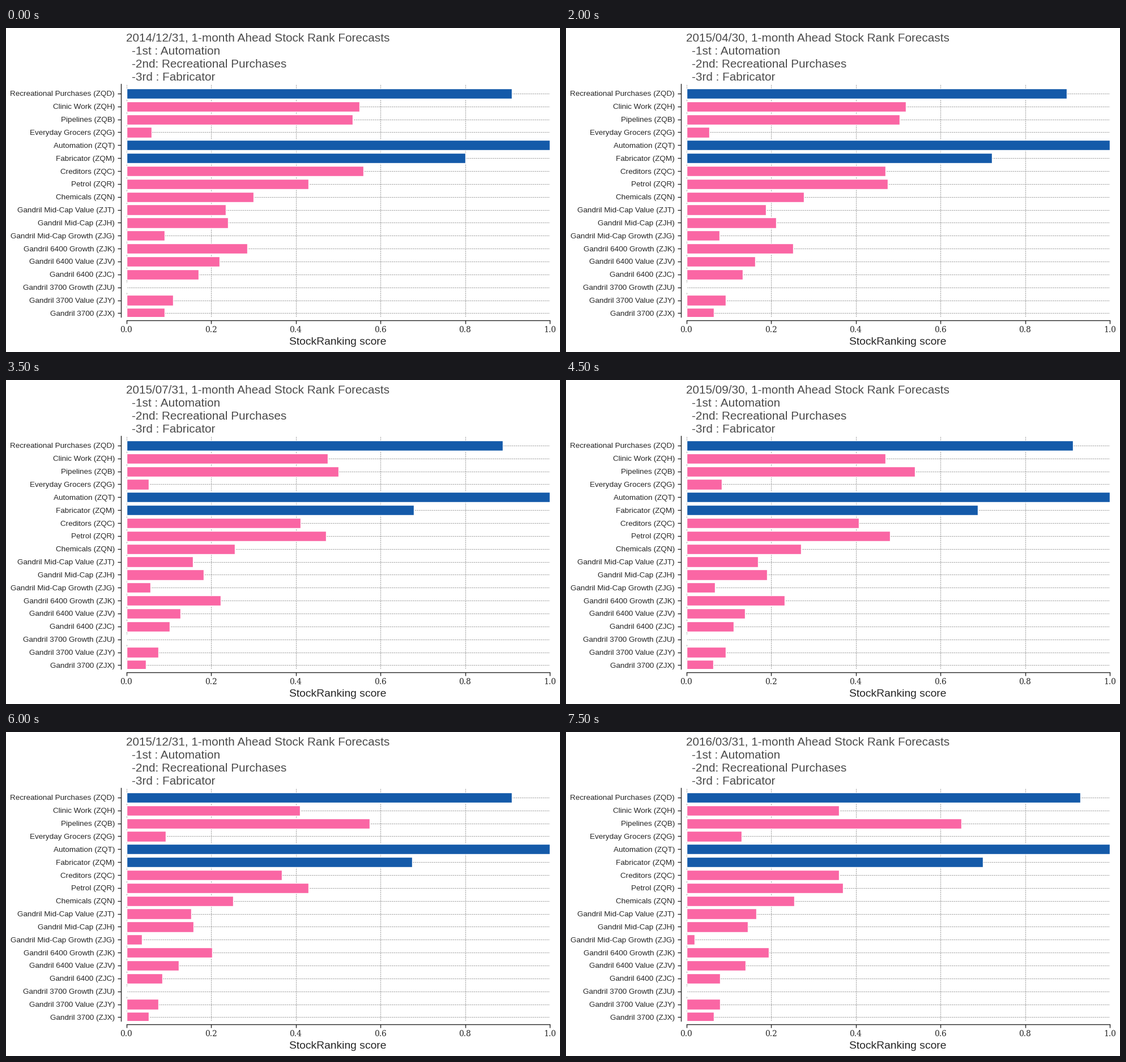
These frames come from a looping animation (978x573 px, 8 s). A matplotlib script:

```python
import matplotlib.pyplot as plt
import numpy as np
from matplotlib.animation import FuncAnimation

W, H, DPI = 978, 573, 64
FRAMES, INTERVAL = 16, 500
LEFT, RIGHT, TOP, BOTTOM = 212.5, 960, 98.5, 510.5
ROW, LAST_ROW = 22.85, 504.4
BLUE, PINK, INK, TITLE_INK = "#145aa9", "#fa66a4", "#262626", "#4c4c4c"

# Each row's score at the start, middle and end of the run, top row first.
PATHS = {
    "Recreational Purchases (ZQD)": (0.91, 0.92, 0.93),
    "Clinic Work (ZQH)": (0.55, 0.50, 0.36),
    "Pipelines (ZQB)": (0.535, 0.535, 0.65),
    "Everyday Grocers (ZQG)": (0.06, 0.085, 0.13),
    "Automation (ZQT)": (1, 1, 1),
    "Fabricator (ZQM)": (0.80, 0.705, 0.70),
    "Creditors (ZQC)": (0.56, 0.435, 0.36),
    "Petrol (ZQR)": (0.43, 0.50, 0.37),
    "Chemicals (ZQN)": (0.30, 0.285, 0.255),
    "Gandril Mid-Cap Value (ZJT)": (0.235, 0.185, 0.165),
    "Gandril Mid-Cap (ZJH)": (0.24, 0.21, 0.145),
    "Gandril Mid-Cap Growth (ZJG)": (0.09, 0.085, 0.02),
    "Gandril 6400 Growth (ZJK)": (0.285, 0.25, 0.195),
    "Gandril 6400 Value (ZJV)": (0.22, 0.155, 0.14),
    "Gandril 6400 (ZJC)": (0.17, 0.13, 0.08),
    "Gandril 3700 Growth (ZJU)": (0, 0, 0),
    "Gandril 3700 Value (ZJY)": (0.11, 0.105, 0.08),
    "Gandril 3700 (ZJX)": (0.09, 0.075, 0.065),
}
LABELS = list(PATHS)


def pt(pixels):
    return pixels * 72 / DPI


def score(path, month):
    start, middle, end = path
    if start in (0, 1):  # the scale's fixed ends
        return start
    u = month / (FRAMES - 1)
    bow = 4 * u * (1 - u) * (middle - (start + end) / 2)
    # All rows share a dip every five months that fades over time.
    dip = 0.08 * np.exp(-month / 8) * np.sin(np.pi * month / 5) ** 2
    return max(0, start + (end - start) * u + bow - dip)


def put_text(x, baseline, text, size, color, **kw):
    return fig.text(x / W, 1 - baseline / H, text, fontsize=pt(size),
                    color=color, va="baseline", **kw)


plt.rcParams["font.family"] = "Liberation Sans"
fig = plt.figure(figsize=(W / DPI, H / DPI), dpi=DPI, facecolor="white")
ax = fig.add_axes([LEFT / W, 1 - BOTTOM / H,
                   (RIGHT - LEFT) / W, (BOTTOM - TOP) / H])
ax.set_xlim(0, 1)
ax.set_ylim((LAST_ROW - BOTTOM) / ROW, (LAST_ROW - TOP) / ROW)

rows = np.arange(len(LABELS))[::-1]
bars = ax.barh(rows, 0, height=0.8, edgecolor="white", linewidth=pt(1.4))

for side in ("top", "right"):
    ax.spines[side].set_visible(False)
for side, gap in (("left", 9.5), ("bottom", 6)):
    ax.spines[side].set(color=INK, linewidth=pt(1.4))
    ax.spines[side].set_position(("outward", pt(gap)))

# Moving a spine resets its ticks, so they are styled afterwards.
ax.set_axisbelow(True)
ax.grid(color="gray", linestyle="--", linewidth=pt(0.7))
ax.set_yticks(rows, LABELS)
ax.set_xticks(np.linspace(0, 1, 6))
ax.tick_params(length=pt(6), width=pt(1.4), pad=pt(5),
               color=INK, labelcolor=INK)
ax.tick_params(axis="y", labelsize=pt(13.46))
ax.tick_params(axis="x", labelsize=pt(13.9), labelfontfamily="DejaVu Serif")

lines = [put_text(222 if k else 212.5, 24 + 23 * k, "", 20.74, TITLE_INK)
         for k in range(4)]
put_text(585.5, 560.5, "StockRanking score", 19.3, INK, ha="center")


def update(month):
    scores = np.array([score(path, month) for path in PATHS.values()])
    best = np.argsort(-scores)[:3]
    for k, bar in enumerate(bars):
        bar.set_width(scores[k])
        bar.set_facecolor(BLUE if k in best else PINK)

    next_month = np.datetime64("2015-01", "M") + month
    day = next_month.astype("datetime64[D]") - 1
    date = str(day).replace("-", "/")
    lines[0].set_text(f"{date}, 1-month Ahead Stock Rank Forecasts")
    for line, place, k in zip(lines[1:], ("1st :", "2nd:", "3rd :"), best):
        line.set_text(f"-{place} {LABELS[k].split(' (')[0]}")
    return [*bars, *lines]


anim = FuncAnimation(fig, update, frames=FRAMES, interval=INTERVAL,
                     repeat=True, repeat_delay=0, blit=False)
plt.show()
```
